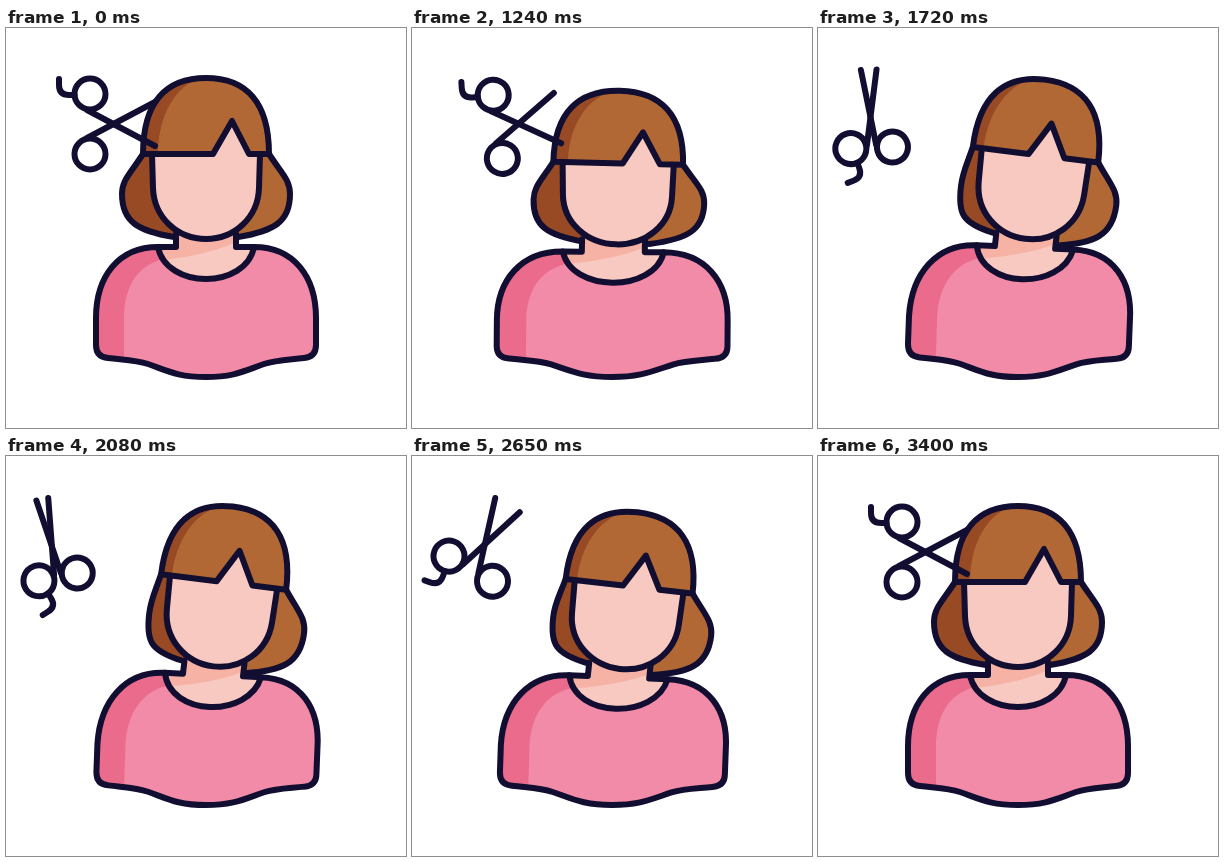
An HTML page that plays this animation: 400x400 px, repeating every 3430 ms.

```html
<!DOCTYPE html>
<html lang="en">
<head>
<meta charset="utf-8">
<title>Haircut</title>
<style>
  html, body { margin: 0; width: 100%; height: 100%; overflow: hidden; background: #fff; }
  svg { display: block; width: 100vw; height: 100vh; }
  .line { fill: none; stroke: #110e31; stroke-width: 6; stroke-linecap: round; stroke-linejoin: round; }
</style>
</head>
<body>
<svg viewBox="0 0 400 400">
  <g id="figure"></g>
  <g class="line">
    <g id="bladeA">
      <circle cx="-24" cy="-30" r="15.5"/>
      <path d="M-27 -14L41 22M-39.5 -29H-45Q-55 -29 -55 -39V-45"/>
    </g>
    <g id="bladeB">
      <circle cx="-24" cy="-30" r="15.5"/>
      <path d="M-27 -14L41 22"/>
    </g>
  </g>
</svg>
<script>
const LOOP = 3430, STEP = 30, START = 1030, MIDDLE = 2075, PEAK = 815, END = 1060;
const HAIR = '#b26835', HAIR_DARK = '#984a24', SKIN = '#f8c9c0', SKIN_DARK = '#f6b3a5';
const PINK = '#f28ba8', PINK_DARK = '#ea6b8b';

// Values by distance in time from the middle of the move
const keyTimes = [0, 400, 575, 655, PEAK, END];
const tracks = {
  turn:   [1, 1, 1, .92, .41, 0],
  tilt:   [7, 7, 6.5, 6.1, 1.5, 0],
  squash: [0, .1, .45, .6, 1, 0],
  angle:  [-101.5, -90, -60, -42, -9.5, 0],
  open:   [15.5, 21, 36, 58, 67, 57],
  x:      [45.5, 54, 73.3, 84, 106.7, 108],
  y:      [88.5, 87.5, 87.5, 89, 95.7, 96]
};

// Monotone cubic interpolation
function sample(v, d) {
  const n = keyTimes.length - 1;
  const slope = i => (v[i + 1] - v[i]) / (keyTimes[i + 1] - keyTimes[i]);
  const tangent = i => {
    if (i === 0 || i === n) return 0;
    const a = slope(i - 1), b = slope(i);
    return a * b <= 0 ? 0 : 2 * a * b / (a + b);
  };
  let i = 0;
  while (i < n - 1 && d > keyTimes[i + 1]) i++;
  const h = keyTimes[i + 1] - keyTimes[i], u = (d - keyTimes[i]) / h, w = 1 - u;
  return v[i] * w * w * (1 + 2 * u) + v[i + 1] * u * u * (3 - 2 * u)
    + h * u * w * (tangent(i) * w - tangent(i + 1) * u);
}

function moment(t) {
  if (t < START) return END;
  if (t > MIDDLE + PEAK) {
    const q = Math.min(1, (t - MIDDLE - PEAK) / 510);
    return PEAK + (END - PEAK) * q * (2 - q);
  }
  return Math.min(END, Math.abs(t - MIDDLE));
}

const inNotch = (x, y) => x > 200 && x < 250 && y > 80;

// Each mapper takes a resting point and returns the posed one
const mappers = {
  body(x, y, p) {
    const lift = (349 - y) / 130;
    return [200 + (x - 200) * (1 + .05 * p.squash) + p.tilt * lift * lift,
      y + (349 - y) * .0385 * p.squash + .0064 * p.tilt * (x - 200) * lift];
  },
  head(x, y, p) {
    const r = p.tilt * Math.PI / 180, c = Math.cos(r), s = Math.sin(r);
    const dx = (x - 200) * (1 + .03 * p.squash);
    const dy = y - 127 + p.squash * (13 - 7.5 * (y - 50) / 161);
    return [200 + 17.5 * p.turn + dx * c - dy * s, 127 + dx * s + dy * c];
  },
  fringe(x, y, p) {
    return mappers.head(x - (inNotch(x, y) ? 2 * p.tilt : 0), y, p);
  },
  shine(x, y, p) {
    return x < 195 ? mappers.head(x - .6 * p.tilt, y, p) : mappers.fringe(x, y, p);
  },
  lobe(x, y, p) {
    const far = Math.max(0, Math.abs(x - 200) - 63) / 21;
    return x < 200
      ? mappers.head(x + 2 * p.tilt * far, y, p)
      : mappers.head(x + .3 * p.tilt * far, y + .7 * p.tilt * Math.max(0, y - 160) / 49, p);
  }
};

const lobeL = 'M137 126C124 146 116 152 116 166C116 194 132 203 168 209';
const lobeR = 'M263 126C276 146 284 152 284 166C284 194 268 203 232 209';
const neckline = 'C244 240 222 251 200 251C178 251 156 240 152 219';
const hem = 'C120 332 130 332 142 336C162 343 172 349 200 349C228 349 238 343 258 336' +
  'C270 332 280 332 298 330Q310 329 310 317L310 290C310 249 288 219 248 219';
const shirt = 'M152 219C112 219 90 249 90 290L90 317Q90 329 102 330' + hem + neckline + 'Z';
const face = 'M146 126L147 160C148 190 172 211 200 211C228 211 252 190 253 160L254 126';
const fringe = 'L243 126L226 93L207 126';
const cap = 'M137 126C137 74 160 50 200 50C240 50 263 74 263 126' + fringe + 'Z';

const parts = [
  ['lobe', lobeL + 'L200 209L200 126Z', HAIR_DARK],
  ['lobe', lobeR + 'L200 209L200 126Z', HAIR],
  ['lobe', lobeL],
  ['lobe', lobeR],
  ['body', 'M170 200L230 200L230 219L248 219' + neckline + 'L170 219Z', SKIN],
  ['body', 'M170 200L230 200L230 214Q205 226 158 232L152 219L170 219Z', SKIN_DARK],
  ['body', shirt, PINK_DARK],
  ['body', 'M158 231C130 237 118 261 118 290L118 332' + hem +
    'C244 240 222 251 200 251C183 251 168 244 158 231Z', PINK],
  ['body', shirt],
  ['body', 'M170 206L170 219L152 219M230 206L230 219L248 219'],
  ['head', face + 'Z', SKIN],
  ['head', face],
  ['fringe', 'M207 126L226 93L243 126L240 140L210 140Z', SKIN],
  ['fringe', cap, HAIR_DARK],
  ['shine', 'M152 126C152 95 164 62 192 51L200 50C240 50 263 74 263 126' + fringe + 'Z', HAIR],
  ['fringe', cap]
].map(([map, d, fill]) => {
  const el = document.createElementNS('http://www.w3.org/2000/svg', 'path');
  if (fill) el.setAttribute('fill', fill);
  else el.setAttribute('class', 'line');
  document.getElementById('figure').appendChild(el);
  return { el, d, map: mappers[map] };
});

const bladeA = document.getElementById('bladeA');
const bladeB = document.getElementById('bladeB');

function draw(t) {
  const d = moment(t), p = {};
  for (const name in tracks) p[name] = sample(tracks[name], d);
  for (const part of parts) {
    part.el.setAttribute('d', part.d.replace(/([\d.]+) ([\d.]+)/g, (_, x, y) =>
      part.map(+x, +y, p).map(v => v.toFixed(2)).join(' ')));
  }
  const spread = (p.open - 57) / 2, at = `translate(${p.x} ${p.y}) `;
  bladeA.setAttribute('transform', at + `rotate(${p.angle + spread})`);
  bladeB.setAttribute('transform', at + `rotate(${p.angle - spread}) scale(1 -1)`);
}

const begin = performance.now();
function tick() {
  const t = Math.max(0, performance.now() - begin) % LOOP;
  draw(t < START ? 0 : START + Math.floor((t - START) / STEP) * STEP);
  requestAnimationFrame(tick);
}
tick();
</script>
</body>
</html>
```
